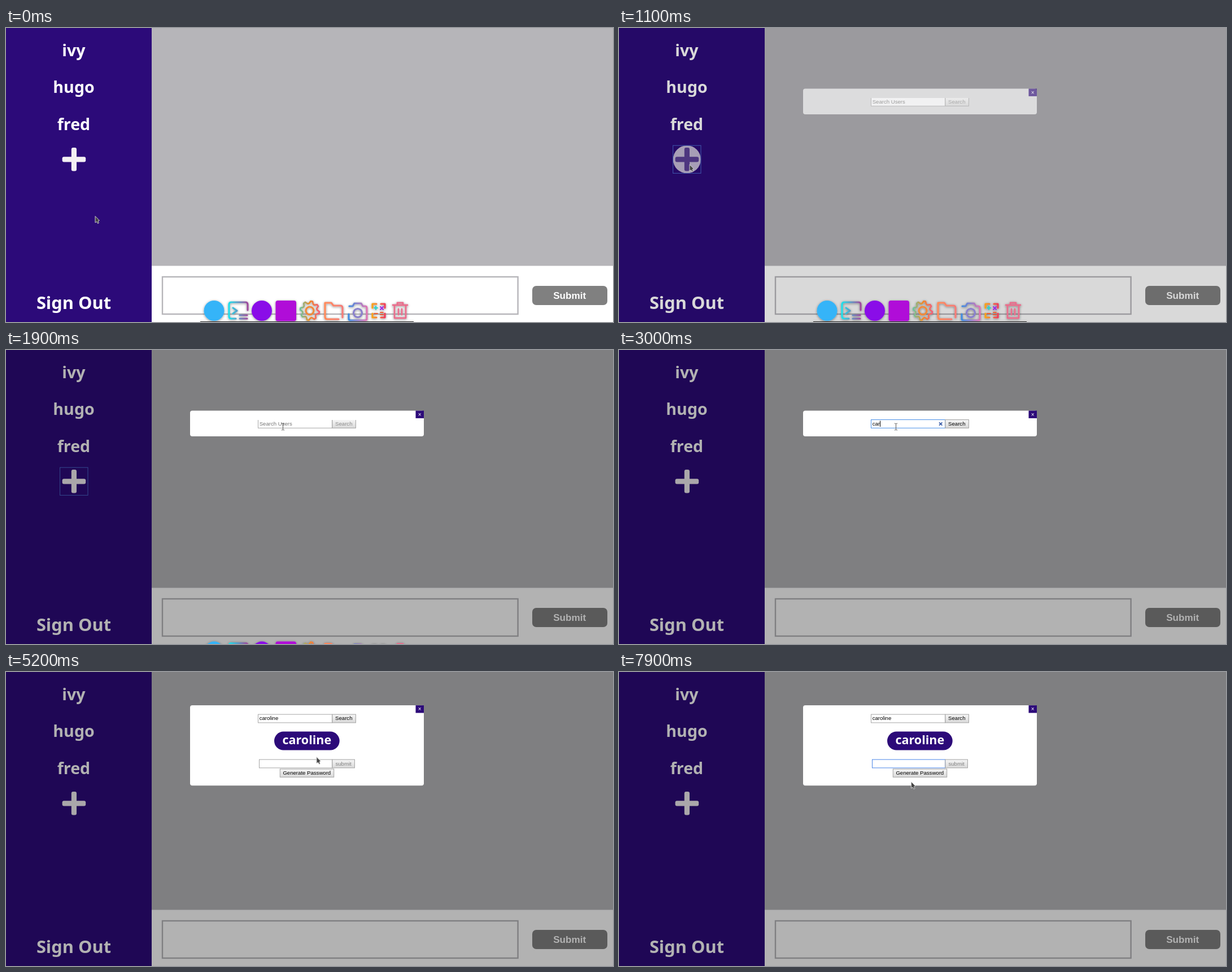
An HTML page that plays this animation: 1075 by 521 pixels, repeating every 8 s.

```html
<!DOCTYPE html>
<html lang="en">
<head>
<meta charset="utf-8">
<title>Chat</title>
<style>
html, body { margin: 0; width: 100%; height: 100%; overflow: hidden; background: #fff; }
svg { display: block; width: 100vw; height: 100vh; }
text { font-family: "Liberation Sans", Arial, sans-serif; }
.side { font: 600 28.6px "Noto Sans", sans-serif; fill: #fff; text-anchor: middle; }
.ui { font-size: 9.6px; }
.mid { text-anchor: middle; }
.field { fill: #fff; stroke: #a6a6a6; }
.btn { fill: url(#face); stroke: #a2a2a2; }
.dock { fill: none; stroke-width: 3.2; stroke-linejoin: round; stroke-linecap: round; }
</style>
</head>
<body>
<svg viewBox="0 0 1075 521">
  <defs>
    <linearGradient id="face" x2="0" y2="1"><stop stop-color="#f5f5f5"/><stop offset="1" stop-color="#d9d9d9"/></linearGradient>
    <linearGradient id="term"><stop stop-color="#1fe0ea"/><stop offset="1" stop-color="#a04a9c"/></linearGradient>
    <linearGradient id="gear"><stop stop-color="#6cc5a0"/><stop offset=".5" stop-color="#f08a28"/><stop offset="1" stop-color="#f0607a"/></linearGradient>
    <linearGradient id="fold"><stop stop-color="#ff8a5a"/><stop offset="1" stop-color="#f47c78"/></linearGradient>
    <linearGradient id="cam"><stop stop-color="#3f8ce0"/><stop offset="1" stop-color="#dd74b4"/></linearGradient>
    <linearGradient id="calc"><stop stop-color="#f7a21c"/><stop offset="1" stop-color="#ee3f5c"/></linearGradient>
    <clipPath id="trim"><rect x="326" y="16.4" width="414" height="60"/></clipPath>
    <filter id="glow" x="-20%" y="-50%" width="140%" height="200%"><feDropShadow dx="0" dy="1" stdDeviation="2" flood-opacity=".45"/></filter>
  </defs>

  <rect width="1075" height="521" fill="#fff"/>
  <rect x="258" width="817" height="421.5" fill="#b6b5b9"/>
  <rect width="258" height="521" fill="#2c0a79"/>
  <g id="people"></g>
  <text class="side" x="120" y="498" style="font-size:30.8px">Sign Out</text>
  <circle id="halo" cx="120.3" cy="232.8" r="24.6" fill="#f3eff3"/>
  <g id="plus">
    <rect x="99.6" y="228.2" width="41.6" height="9.2" rx="3"/>
    <rect x="115.8" y="212" width="9.2" height="41.6" rx="3"/>
  </g>
  <rect id="ring" x="95.6" y="208.2" width="49.4" height="49.2" fill="none" stroke="#4b68cc"/>
  <rect x="277" y="441" width="629.6" height="66" fill="#fff" stroke="#b6b5b9" stroke-width="2.4"/>
  <rect x="932" y="457" width="133" height="34" rx="7" fill="#808080"/>
  <text class="mid" x="998.2" y="480" font-size="17.1" font-weight="700" fill="#fff">Submit</text>

  <rect id="shade" width="1075" height="521"/>

  <g id="modal">
    <rect id="panel" x="326" width="414" rx="4" fill="#fff"/>
    <g id="body">
      <rect x="725.5" width="14.5" height="13.4" fill="#2c0a79"/>
      <text class="mid" x="732.7" y="10.2" font-size="10" fill="#fff">×</text>
      <g id="row">
        <rect id="query" class="field" x="446.5" y="16" width="131" height="14.8"/>
        <text id="typed" class="ui" x="448.7" y="26.2"></text>
        <path id="clear" d="M567 20.8l5.4 5.4m0-5.4l-5.4 5.4" stroke="#3a5da8" stroke-width="1.8"/>
        <rect class="btn" x="577.8" y="16" width="41.6" height="14.8"/>
        <text id="search" class="ui mid" x="598.3" y="26.2">Search</text>
      </g>
      <path id="caret" stroke="#000"/>
      <g id="result">
        <rect x="475" y="46.5" width="115.7" height="33" rx="16.5" fill="#2c0a79"/>
        <text id="match" class="mid" x="532.8" y="69" style="font:600 21.5px 'Noto Sans',sans-serif" fill="#fff"></text>
      </g>
      <g id="secret">
        <rect id="pass" class="field" x="448.5" y="96" width="129" height="14.8"/>
        <rect class="btn" x="577.8" y="96" width="39.6" height="14.8"/>
        <text class="ui mid" x="597.6" y="106.5" fill="#808080">submit</text>
        <rect class="btn" x="485.3" y="112.8" width="95.4" height="14.4"/>
        <text class="ui mid" x="532.8" y="122.6">Generate Password</text>
      </g>
    </g>
  </g>

  <g id="dock" filter="url(#glow)">
    <path d="M344 520.5H722" stroke="#222"/>
    <circle cx="368.5" cy="501" r="18" fill="#36b4f8"/>
    <g class="dock">
      <path d="M428 500V490q0-4-4-4H399q-4 0-4 4V511q0 4 4 4H407M402 496l7 5-7 5M414 509H427M414 515H427" stroke="url(#term)"/>
    </g>
    <circle cx="453" cy="501" r="18" fill="#8a0ce8"/>
    <rect x="477.5" y="483" width="36.5" height="36.5" rx="4" fill="#b010d8"/>
    <g class="dock">
      <path id="cog" stroke="url(#gear)" stroke-width="2.8"/>
      <circle cx="538" cy="501" r="7" stroke="#f08a3a"/>
      <path d="M589 516H569Q565 516 565 512V487H576L580 492H592Q596 492 596 496V513" stroke="url(#fold)"/>
      <path d="M607 507V515Q607 518 610 518H636Q639 518 639 515V496Q639 493 636 493H632L629 488H617L614 493H608" stroke="url(#cam)"/>
      <circle cx="623" cy="505" r="7.5" stroke="#8a80cc"/>
      <path d="M656 489H649V496M664 489H671V496M649 506V513H656M671 506V513H664" stroke="url(#calc)"/>
      <path d="M652 496H658M655 493V499" stroke="#22d5d0" stroke-width="2"/>
      <path d="M663 494l5 5m0-5l-5 5" stroke="#9a28e8" stroke-width="2"/>
      <path d="M652 506H658M663 504H668M663 508H668" stroke="#f06038" stroke-width="2"/>
      <path d="M685 491H711M693 490V487H703V490M688 492V514H708V492M695 498V508M701 498V508" stroke="#e86e8c" stroke-width="2.8"/>
    </g>
  </g>

  <g id="pointer">
    <path id="arrow" d="M0 0V11.5L2.7 9.6L4.6 13L6.4 12L5 8.6L7.4 7.6Z" fill="#454545" stroke="#ddd" stroke-width=".9"/>
    <path id="beam" d="M-2.5-6Q0-6 0-4.5Q0-6 2.5-6M0-4.5V4.5M-2.5 6Q0 6 0 4.5Q0 6 2.5 6" fill="none" stroke="#555"/>
    <path id="hand" d="M-2-6Q-.8-7.5 0-6V-2L4-1.3Q6-.8 6 1L5 6.5H-2L-6 1Q-6-1-4 0L-2 1.5Z" fill="#454545" stroke="#bbb" stroke-width=".7"/>
  </g>
</svg>
<script>
const LOOP = 8000, TICK = 100;
const people = ["ivy", "hugo", "fred"], friend = "caroline";
const el = {};
document.querySelectorAll("[id]").forEach(e => el[e.id] = e);

// time, x, y
const path = [
  [300, 158, 333.5], [500, 150, 308], [700, 131, 258], [900, 125, 243], [1100, 125, 242],
  [1200, 186, 217.5], [1400, 330, 178], [1600, 442, 146], [1800, 486, 136], [1900, 490.5, 136],
  [3700, 490.5, 136], [3800, 492, 141], [4200, 492, 141], [4500, 543, 153], [4600, 543, 153],
  [4800, 550, 154], [5000, 550, 154], [5200, 550, 150.5], [5400, 550, 150.5], [5700, 541, 181],
  [5900, 530, 193], [6100, 545, 163], [6200, 545, 163], [6500, 496, 164], [7200, 496, 164],
  [7400, 584, 163], [7500, 584, 163], [7700, 556, 202], [7800, 530, 207], [7900, 517.5, 194.5]
];

const clamp = v => Math.max(0, Math.min(1, v));
const mix = (a, b, k) => a + (b - a) * k;
const set = (e, attrs) => { for (const k in attrs) e.setAttribute(k, attrs[k]); };
const show = (e, on) => e.style.display = on ? "" : "none";
const between = (t, a, b) => t >= a && t < b;

function pointerAt(t) {
  const i = path.findIndex(p => p[0] >= t);
  if (i <= 0) return path[i < 0 ? path.length - 1 : 0].slice(1);
  const [t0, x0, y0] = path[i - 1], [t1, x1, y1] = path[i];
  const k = (t - t0) / (t1 - t0);
  return [mix(x0, x1, k), mix(y0, y1, k)];
}

function pointerKind(t) {
  if (between(t, 900, 1000) || between(t, 3800, 5200)) return "hand";
  if (between(t, 1800, 3800) || between(t, 6200, 7400)) return "beam";
  return "arrow";
}

function setup() {
  el.people.innerHTML = people.map((n, i) =>
    `<text class="side" x="120" y="${50 + 65.4 * i}">${n}</text>`).join("");
  el.match.textContent = friend;
  let d = "";
  for (let i = 0; i < 32; i++) {
    const r = i % 4 < 2 ? 17 : 13, a = (i + .5) * Math.PI / 16;
    d += (i ? "L" : "M") + (538 + r * Math.cos(a)).toFixed(1) + " " + (501 + r * Math.sin(a)).toFixed(1);
  }
  el.cog.setAttribute("d", d + "Z");
}

function drawSidebar(t) {
  const hover = clamp((t - 700) / 200) * clamp(1 - (t - 1050) / 215);
  const from = [243, 239, 243], to = [44, 10, 121];
  set(el.halo, { opacity: hover });
  set(el.plus, { fill: `rgb(${from.map((c, i) => Math.round(mix(c, to[i], hover)))})` });
  show(el.ring, between(t, 1000, 2200));
}

function drawModal(t) {
  const fade = clamp((t - 1000) / 200);
  const stage = t < 3700 ? 0 : t < 5100 ? 1 : 2;
  const half = [22.7, 54.8, 71.1][stage], top = 130.2 - half;
  set(el.shade, { opacity: .3 * fade });
  show(el.modal, fade > 0);
  set(el.panel, { y: top, height: half * 2, opacity: fade < 1 ? fade * 1.3 : 1 });
  set(el.body, { transform: `translate(0 ${top})`, opacity: fade < 1 ? fade * 1.25 : 1 });
  set(el.row, { "clip-path": stage || t >= 2200 ? "none" : "url(#trim)" });

  const count = Math.max(0, Math.min(friend.length, Math.floor((t - 2800) / 100) + 1));
  const asking = between(t, 2200, 5100), locking = t >= 6800;
  el.typed.textContent = count ? friend.slice(0, count) : "Search Users";
  set(el.typed, { fill: count ? "#000" : "#757575" });
  set(el.search, { fill: count ? "#000" : "#8a8a8a" });
  show(el.clear, asking && count);
  el.query.style.stroke = asking ? "#4a90e8" : "";
  el.pass.style.stroke = locking ? "#4a86e8" : "";
  show(el.result, stage > 0);
  show(el.secret, stage > 1);

  const first = between(t, 2200, 4300) || between(t, 4800, 5100);
  show(el.caret, first || between(t, 6800, 7300));
  const x = first ? 449.2 + (count ? el.typed.getComputedTextLength() : 0) : 451;
  set(el.caret, { d: `M${x} ${first ? 18 : 98}v10.5` });
}

function draw(t) {
  drawSidebar(t);
  drawModal(t);
  show(el.dock, t < 2000);
  set(el.dock, { transform: `translate(0 ${42 * clamp((t - 1500) / 500)})` });
  set(el.pointer, { transform: `translate(${pointerAt(t)})` });
  const kind = pointerKind(t);
  for (const k of ["arrow", "beam", "hand"]) show(el[k], k === kind);
}

const start = performance.now();
function loop() {
  const t = (performance.now() - start) % LOOP;
  draw(Math.floor(t / TICK) * TICK);
  requestAnimationFrame(loop);
}
setup();
loop();
</script>
</body>
</html>
```
